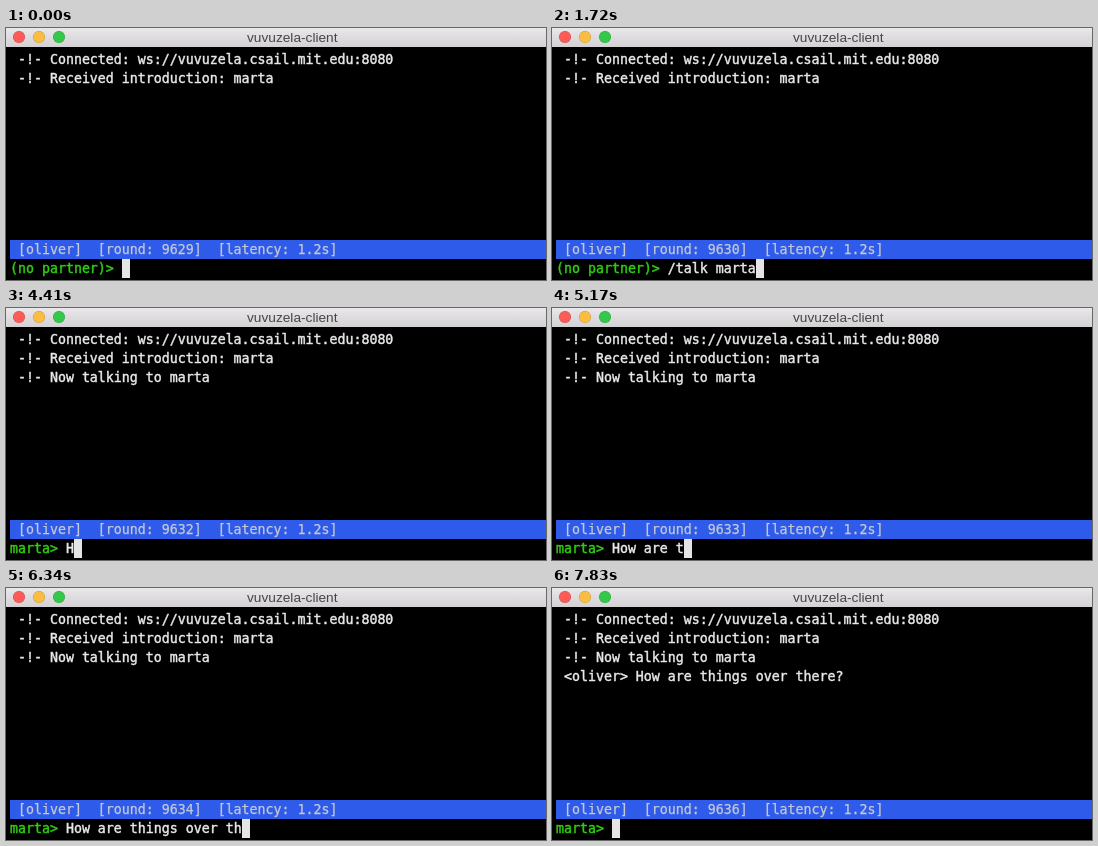
An HTML page for the animation above (8 s loop, 540 by 252 pixels).

```html
<!DOCTYPE html>
<html lang="en">
<head>
<meta charset="utf-8">
<title>vuvuzela-client</title>
<style>
html, body { margin: 0; width: 100%; height: 100%; overflow: hidden; background: #000; }
#stage { position: relative; width: 540px; height: 252px; overflow: hidden; background: #000; }
#bar {
  position: absolute; left: 0; top: 0; width: 540px; height: 19px;
  background: linear-gradient(#e9e7e9, #d3d1d3);
}
#bar span {
  position: absolute; left: 241px; top: 0; line-height: 19px; white-space: nowrap;
  font-family: "Liberation Sans", sans-serif; font-size: 13.7px; color: #454545;
}
#bar i {
  position: absolute; top: 3px; width: 12px; height: 12px; border-radius: 50%;
  box-shadow: inset 0 0 0 .5px rgba(0, 0, 0, .2);
}
.row {
  position: absolute; left: 4px; width: 536px; height: 19px; line-height: 19px; white-space: pre;
  font-family: "DejaVu Sans Mono", monospace; font-size: 13.288px;
  color: #e8e8e8; -webkit-text-stroke: .45px;
}
#status { top: 212px; background: #2f5bea; color: #c6c9d2; -webkit-text-stroke: .25px; }
#input { top: 231px; }
#cursor { position: absolute; top: 231px; width: 8px; height: 19px; background: #e5e5e5; }
</style>
</head>
<body>
<div id="stage">
  <div id="bar">
    <i style="left:7px;background:#fc5b57"></i>
    <i style="left:27px;background:#fdbd40"></i>
    <i style="left:47px;background:#34c84a"></i>
    <span>vuvuzela-client</span>
  </div>
  <div class="row" id="status"></div>
  <div class="row" id="input"><span id="prompt"></span><span id="typed"></span></div>
  <div id="cursor"></div>
</div>
<script>
const LOOP = 8000, CELL = 8, LINE = 19;
const GREEN = '#2fce12', RED = '#d9230f';
const $ = id => document.getElementById(id);
const me = 'oliver', friend = 'marta';
const command = '/talk ' + friend, message = 'How are things over there?';

// [appears at, text]
const log = [
  [0, ' -!- Connected: ws://vuvuzela.csail.mit.edu:8080'],
  [0, ' -!- Received introduction: ' + friend],
  [2080, ' -!- Now talking to ' + friend],
  [7170, ` <${me}> ${message}`]
];
// [from, round, latency]
const status = [
  [0, 9629, '1.2s'], [838, 9630, '1.2s'], [2080, '-', '-'], [2850, 9631, '-'],
  [3870, 9632, '-'], [3930, 9632, '1.2s'], [4833, 9633, '1.2s'],
  [5810, 9634, '1.2s'], [6810, 9635, '1.2s'], [7830, 9636, '1.2s']
];
const prompts = [
  [0, '(no partner)>', GREEN], [2080, friend + '>', RED], [3930, friend + '>', GREEN]
];
// bursts of keys: [first key, last key, count]
const commandKeys = [[350, 350, 1], [530, 940, 5], [1240, 1720, 5]];
const messageKeys = [[4410, 4410, 1], [4580, 5340, 10], [5400, 5810, 6], [5990, 6510, 8], [6810, 6810, 1]];

const current = (steps, t) => steps.filter(s => s[0] <= t).pop();

function keyCount(bursts, t) {
  let n = 0;
  for (const [first, last, count] of bursts)
    for (let i = 0; i < count; i++) {
      const at = first + (last - first) * i / Math.max(1, count - 1);
      if (Math.floor(at) <= t) n++;
    }
  return n;
}

function typedAt(t) {
  if (t < 2080) return command.slice(0, keyCount(commandKeys, t));
  if (t < 7170) return message.slice(0, keyCount(messageKeys, t));
  return '';
}

function put(el, text) {
  if (el.textContent !== text) el.textContent = text;
}

const rows = log.map(([, text], i) => {
  const row = document.createElement('div');
  row.className = 'row';
  row.style.top = 22 + i * LINE + 'px';
  row.textContent = text;
  $('stage').append(row);
  return row;
});

function draw(t) {
  rows.forEach((row, i) => row.style.visibility = log[i][0] <= t ? 'visible' : 'hidden');
  const [, round, latency] = current(status, t);
  const [, prompt, color] = current(prompts, t);
  const typed = typedAt(t);
  put($('status'), ` [${me}]  [round: ${round}]  [latency: ${latency}]`);
  put($('prompt'), prompt);
  $('prompt').style.color = color;
  put($('typed'), ' ' + typed);
  $('cursor').style.left = 4 + (prompt.length + 1 + typed.length) * CELL + 'px';
}

const start = performance.now();
function tick() {
  draw((performance.now() - start) % LOOP);
  requestAnimationFrame(tick);
}
tick();
</script>
</body>
</html>
```
